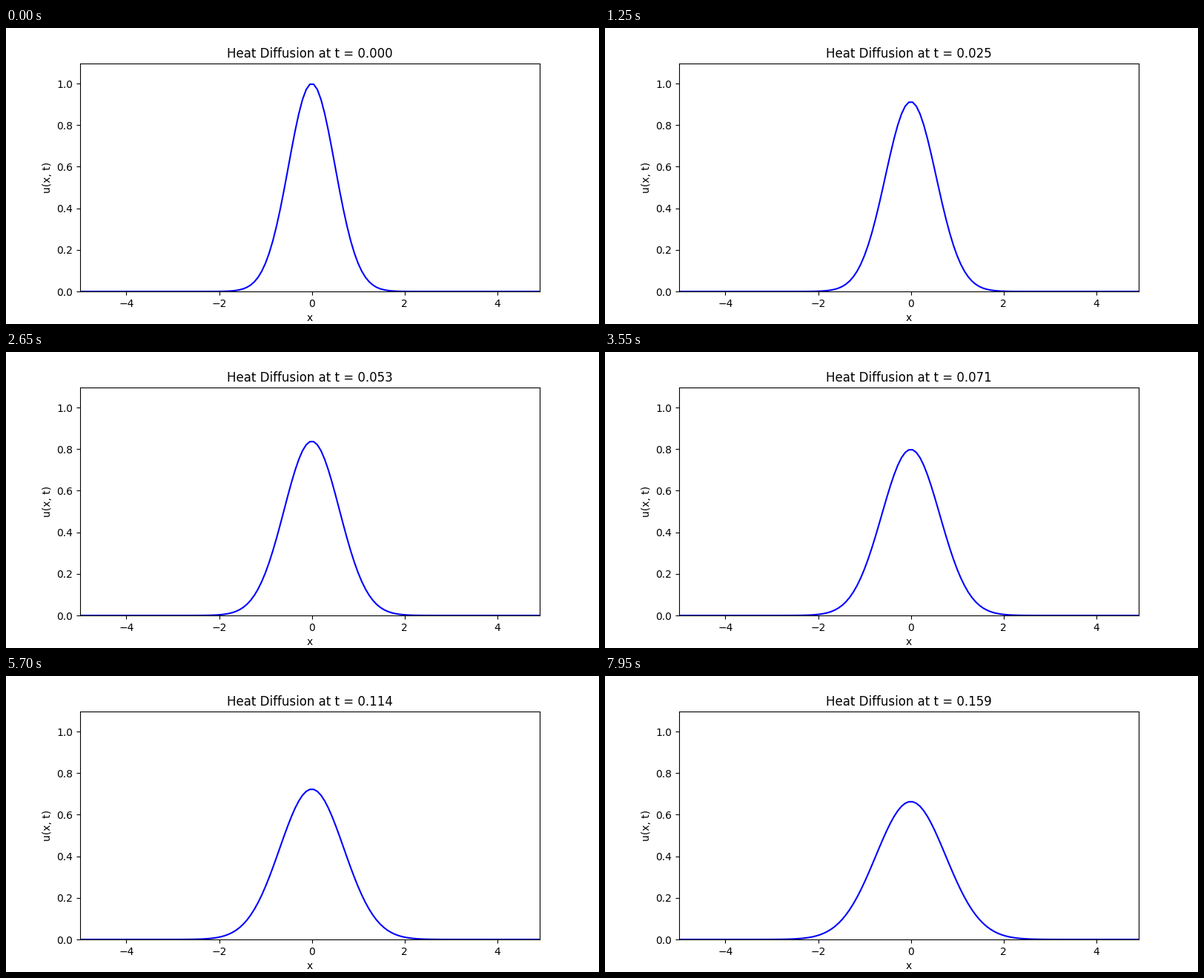
Write a matplotlib script that moves like this. It is 800 px wide and 400 px high and loops after 8000 ms.

```python
import numpy as np
import matplotlib.pyplot as plt
from matplotlib.animation import FuncAnimation

ALPHA = 1.0      # diffusivity
SIGMA2 = 0.25    # variance of the initial pulse
DT = 0.001
FRAMES = 160

x = -5 + 0.08 * np.arange(125)


def heat(t):
    """Exact spreading of a Gaussian pulse under the heat equation."""
    var = SIGMA2 + 2 * ALPHA * t
    return np.sqrt(SIGMA2 / var) * np.exp(-x**2 / (2 * var))


u0 = heat(0)

fig, ax = plt.subplots(figsize=(8, 4), dpi=100)
line, = ax.plot(x, u0, color="blue", lw=1.5)
ax.set_xlim(x[0], x[-1])
ax.set_ylim(0, 1.1 * u0.max())
ax.set_xlabel("x")
ax.set_ylabel("u(x, t)")
title = ax.set_title("Heat Diffusion at t = 0.000")


def update(i):
    t = i * DT
    line.set_ydata(heat(t))
    title.set_text(f"Heat Diffusion at t = {t:.3f}")
    return line, title


anim = FuncAnimation(fig, update, frames=FRAMES, interval=50,
                     repeat=True, repeat_delay=0, blit=False)
plt.show()
```
